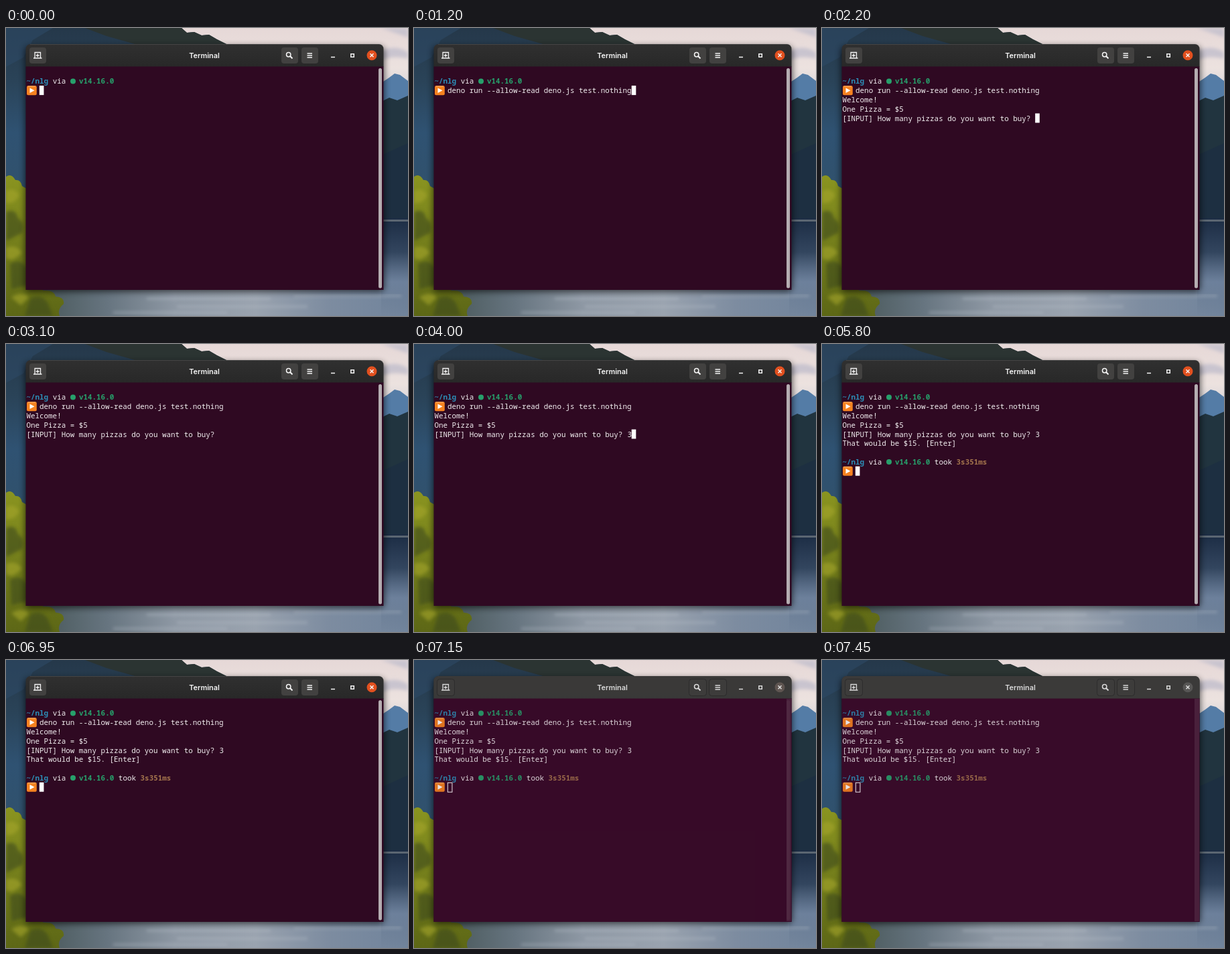
Write an HTML page that moves like this. It is 600 by 430 pixels and loops after 7.75 s.

```html
<!DOCTYPE html>
<html lang="en">
<head>
<meta charset="utf-8">
<title>Terminal</title>
<style>
  html, body { margin: 0; width: 100%; height: 100%; overflow: hidden; background: #22354a; }
  svg { display: block; width: 600px; height: 430px; }
  #rows text { font: 10.908px "Noto Sans Mono", monospace; fill: #f2eef0; white-space: pre; }
  #rows .path { fill: #2d8fb8; font-weight: 700; }
  #rows .version { fill: #27a06b; font-weight: 600; }
  #rows .time { fill: #a2734c; font-weight: 600; }
  .title { font: 600 10.9px Inter, sans-serif; text-anchor: middle; }
</style>
</head>
<body>
<svg viewBox="0 0 600 430">
  <defs>
    <linearGradient id="sky" x2="0" y2="1">
      <stop stop-color="#e6d8d7"/><stop offset=".5" stop-color="#ece2df"/><stop offset="1" stop-color="#c3c7d4"/>
    </linearGradient>
    <linearGradient id="ridge" x2="0" y2="1">
      <stop stop-color="#25384a"/><stop offset=".3" stop-color="#2a4358"/>
      <stop offset=".6" stop-color="#2f5272"/><stop offset="1" stop-color="#31516b"/>
    </linearGradient>
    <linearGradient id="lake" x2="1">
      <stop offset=".1" stop-color="#4c5b5e"/><stop offset=".25" stop-color="#66747f"/>
      <stop offset=".42" stop-color="#8e98a4"/><stop offset=".62" stop-color="#9aa3af"/>
      <stop offset=".8" stop-color="#7d8ca0"/><stop offset="1" stop-color="#71849c"/>
    </linearGradient>
    <linearGradient id="shade" x2="0" y2="1">
      <stop stop-color="#1c2c44"/><stop offset=".35" stop-color="#33465f"/>
      <stop offset=".65" stop-color="#6b7f9b" stop-opacity=".8"/><stop offset="1" stop-color="#62748c" stop-opacity="0"/>
    </linearGradient>
    <linearGradient id="bush" x2="0" y2="1">
      <stop stop-color="#8a9420"/><stop offset=".45" stop-color="#76801c"/><stop offset="1" stop-color="#5d6716"/>
    </linearGradient>
    <linearGradient id="bar" x2="0" y2="1">
      <stop stop-color="#303030"/><stop offset="1" stop-color="#282828"/>
    </linearGradient>
    <filter id="soft" x="-10%" y="-10%" width="120%" height="120%"><feGaussianBlur stdDeviation="5"/></filter>
    <filter id="haze"><feGaussianBlur stdDeviation="2.5"/></filter>
  </defs>

  <!-- landscape -->
  <rect width="600" height="120" fill="url(#sky)"/>
  <path d="M470 0H560L600 14V0ZM560 34Q582 24 600 36V46Q580 40 560 48Z" fill="#c9c4cf" filter="url(#haze)"/>
  <path d="M563 80L572 74 580 68 588 70 600 79V125H563Z" fill="#547ca6"/>
  <path d="M0 0H262L270 7 281 6 292 11 303 10 315 17 331 25V260H0Z" fill="url(#ridge)"/>
  <path d="M118 0L150 12 196 25H331L315 17 303 10 292 11 281 6 270 7 262 0Z" fill="#2b3432"/>
  <path d="M0 0H70L40 18 26 44 0 58Z" fill="#2d4a66" opacity=".6"/>
  <rect y="280" width="600" height="150" fill="url(#lake)"/>
  <path d="M560 110L572 104 584 108 600 101V288H560Z" fill="#21343f"/>
  <path d="M560 190L600 172V288H560Z" fill="#1d2f41"/>
  <rect x="560" y="284" width="40" height="146" fill="url(#shade)"/>
  <path d="M560 286H600V289H560Z" fill="#5b6672"/>
  <path d="M210 404H395M255 416H450M160 425H330M430 400H590" stroke="#bac1ca" stroke-width="3" opacity=".45" filter="url(#haze)"/>
  <path d="M0 222Q8 216 14 227 22 226 24 236L31 240V388Q46 383 56 392 72 391 74 401 88 402 86 412 76 420 80 430H0Z" fill="url(#bush)"/>
  <path d="M0 275Q14 268 18 284 28 290 24 306L0 318ZM6 352Q24 342 31 360V384L8 390ZM36 404Q52 396 62 410L70 430H28Z" fill="#3c4a1c" opacity=".6" filter="url(#haze)"/>
  <path d="M0 244Q12 236 20 250L12 260 0 262ZM0 328Q16 322 24 336L10 346 0 344ZM8 402Q24 392 34 402L22 414Z" fill="#a5a62a" opacity=".6" filter="url(#haze)"/>

  <!-- window -->
  <rect x="28" y="27" width="537" height="367" rx="8" opacity=".6" filter="url(#soft)"/>
  <path d="M29.5 58V32Q29.5 24 37.5 24H555.5Q563.5 24 563.5 32V58Z" fill="url(#bar)"/>
  <path d="M36 24.5H557" stroke="#454545"/>
  <rect x="29.5" y="57.5" width="534" height="333.5" fill="#2f0922"/>
  <g fill="#424140">
    <rect x="35" y="29" width="25" height="24" rx="4"/>
    <rect x="411" y="29" width="25" height="24" rx="4"/>
    <rect x="441" y="29" width="25" height="24" rx="4"/>
  </g>
  <circle cx="546" cy="40.8" r="7.5" fill="#e2501f"/>
  <rect id="scroll" x="556" y="60" width="5" height="328.5" rx="2.5" fill="#b5adb1"/>

  <!-- unfocused look -->
  <g id="backdrop">
    <path d="M29.5 58V32Q29.5 24 37.5 24H555.5Q563.5 24 563.5 32V58Z" fill="#3b3a39"/>
    <rect x="29.5" y="57.5" width="534" height="333.5" fill="#380b29"/>
    <rect x="556" y="58" width="7" height="332" fill="#49203b"/>
    <g fill="#3d3c3b" stroke="#2d2c2c">
      <rect x="34.5" y="28.5" width="26" height="25" rx="4"/>
      <rect x="410.5" y="28.5" width="26" height="25" rx="4"/>
      <rect x="440.5" y="28.5" width="26" height="25" rx="4"/>
    </g>
    <circle cx="546" cy="40.8" r="7.5" fill="#575655"/>
  </g>

  <g id="icons" fill="none" stroke="#f5f5f5" stroke-width="1.5">
    <path d="M43 44.5V36.5H51.5V44.5M41 45H53.5M47.2 38.5V43.5M44.7 41H49.7" stroke-width="1.3"/>
    <circle cx="421.7" cy="39.7" r="3.2"/>
    <path d="M424 42L427.5 45.5" stroke-width="2"/>
    <path d="M449.5 38H457M449.5 41H457M449.5 44H457" stroke-width="1.4"/>
    <path d="M485 43.5H491"/>
    <rect x="514.8" y="38.8" width="4.5" height="4.5"/>
    <path d="M543.5 38.3L548.5 43.3M548.5 38.3L543.5 43.3"/>
    <text class="title" x="296" y="44.8" fill="#f5f5f5" stroke="none">Terminal</text>
  </g>
  <g id="rows"></g>
  <rect id="cursor" width="6.6" height="14"/>
</svg>
<script>
const LOOP = 7750, CELL = 6.545, LINE = 13.8, LEFT = 30.4, TOP = 72.6;
const RECALL = 1050, RUN = 2150, ANSWER = 3400, REPLY = 4150, DONE = 5400, BLUR = 7000;
const BLINK = 600;
const $ = id => document.getElementById(id);
const colX = col => LEFT + col * CELL;
const rowY = row => TOP + row * LINE;

const text = (row, col, content, style = "") =>
  `<text x="${colX(col)}" y="${rowY(row) + 10.8}" class="${style}">${content}</text>`;

const prompt = row => text(row, 0, "~/nlg", "path") + text(row, 6, "via")
  + `<circle cx="100" cy="${rowY(row) + 6.9}" r="4" fill="#27a06b"/>`
  + text(row, 12, "v14.16.0", "version")
  + `<g transform="translate(31 ${rowY(row + 1) - .2})">
      <rect width="14.8" height="14" rx="2" fill="#f58220"/>
      <path d="M1.5 1H13" stroke="#ffb56b"/><path d="M4.5 3.3L11.5 7 4.5 10.7Z" fill="#fff"/></g>`;

// Each block of output appears at its own time.
const blocks = [
  [0, prompt(0)],
  [RECALL, text(1, 3, "deno run --allow-read deno.js test.nothing")],
  [RUN, text(2, 0, "Welcome!") + text(3, 0, "One Pizza = $5")
    + text(4, 0, "[INPUT] How many pizzas do you want to buy?")],
  [ANSWER, text(4, 44, "3")],
  [REPLY, text(5, 0, "That would be $15. [Enter]")],
  [DONE, prompt(7) + text(7, 21, "took") + text(7, 26, "3s351ms", "time")]
];
$("rows").innerHTML = blocks.map(([, markup]) => `<g>${markup}</g>`).join("");
const groups = [...$("rows").children];

// Start of blink cycle, row, column.
const stops = [
  [-350, 1, 3], [RECALL, 1, 45], [RUN - 100, 4, 44],
  [ANSWER + 150, 4, 45], [REPLY, 5, 27], [DONE - 50, 8, 3]
];
const starts = [0, RECALL, RUN, ANSWER, REPLY, DONE];

function drawCursor(t) {
  const [cycle, row, col] = stops[starts.findLastIndex(start => t >= start)];
  const focused = t < BLUR;
  const lit = !focused || Math.floor(Math.max(0, t - cycle) / BLINK) % 2 === 0;
  const cursor = $("cursor"), inset = focused ? 0 : .5;
  cursor.setAttribute("x", colX(col) - .2 + inset);
  cursor.setAttribute("y", rowY(row) - .3 + inset);
  cursor.setAttribute("fill", focused ? "#fff" : "none");
  cursor.setAttribute("stroke", focused ? "none" : "#e8e2e5");
  cursor.style.visibility = lit ? "visible" : "hidden";
}

function draw(t) {
  groups.forEach((group, i) => group.style.display = t >= blocks[i][0] ? "" : "none");
  const p = Math.min(1, Math.max(0, (t - BLUR) / 200));
  const fade = p * (2 - p);
  $("backdrop").style.opacity = fade;
  $("icons").style.opacity = 1 - .15 * fade;
  $("rows").style.opacity = 1 - .12 * fade;
  drawCursor(t);
}

function tick() {
  draw(performance.now() % LOOP);
  requestAnimationFrame(tick);
}
tick();
</script>
</body>
</html>
```
